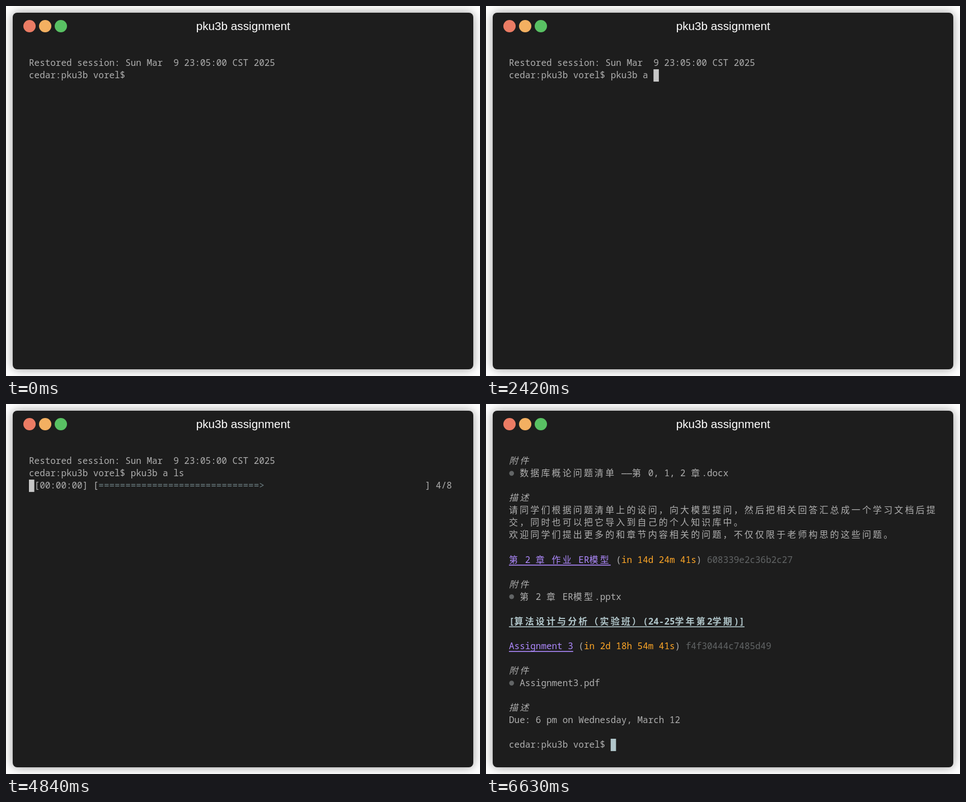
Recreate the animation shown at these times as an HTML page. Size 847 by 661 pixels, loop 8 s.

```html
<!DOCTYPE html>
<html lang="zh-CN">
<head>
<meta charset="utf-8">
<title>pku3b assignment</title>
<style>
  html, body { margin: 0; width: 100%; height: 100%; overflow: hidden; background: #fff; }
  #win {
    position: absolute; left: 12px; top: 12px; width: 823px; height: 637px;
    border-radius: 8px; background: #1d1d1d; box-shadow: 0 0 18px rgba(0, 0, 0, .4);
  }
  svg { position: absolute; left: 0; top: 0; display: block; }
  text { white-space: pre; fill: #afafaf; }
  #title { font: 20.7px "Liberation Sans", Arial, sans-serif; fill: #fff; text-anchor: middle; }
  #screen text { font: 15.945px "Noto Sans Mono", "DejaVu Sans Mono", monospace; }
  #screen .wide {
    font-family: "Noto Sans CJK SC", "Noto Sans CJK JP", "Noto Sans CJK", sans-serif;
    letter-spacing: 3.189px;
  }
  #screen .head { font-style: italic; }
  #screen .bar { fill: #708387; }
  #screen .link { fill: #ae89fe; }
  #screen .time { fill: #ffa727; }
  #screen .dim { fill: #626566; }
  #screen .course { fill: #b1c6ca; font-weight: bold; }
</style>
</head>
<body>
<div id="win"></div>
<svg width="847" height="661" viewBox="0 0 847 661">
  <circle cx="42" cy="36" r="11" fill="#eb7c64"/>
  <circle cx="70" cy="36" r="11" fill="#f3b061"/>
  <circle cx="98" cy="36" r="11" fill="#59c163"/>
  <text id="title" x="423.7" y="43">pku3b assignment</text>
  <g id="screen"></g>
</svg>
<script>
const LOOP = 8000, CELL = 9.567, ROW = 22.045, LEFT = 41, TOP = 91;
const PROMPT = 'cedar:pku3b vorel$ ', COMMAND = 'pku3b a ls';
const KEYS = [1360, 1420, 1680, 1830, 2060, 2230, 2320, 2420, 2730, 2850];
const ENTER = 3500, DONE = 6630;

// [start, message] before the bar, [start, position, total] after it
const STATUS = [
  [3600, 'reading config...'], [3850, 'logging in to blackboard...'], [4380, 'fetching courses...'],
  [4600, 1, 8], [4680, 2, 8], [4760, 3, 8], [4840, 4, 8], [5000, 5, 8], [5020, 6, 8],
  [5200, 6, 9], [5490, 6, 13], [5650, 7, 13], [5830, 8, 13], [5910, 9, 13], [6460, 10, 13]
];

const screenEl = document.getElementById('screen');
const WIDE = /[\u3000-\u9fff\uff00-\uffef]/;
const RUNS = /[\u3000-\u9fff\uff00-\uffef]+|[^\u3000-\u9fff\uff00-\uffef]+/g;
const px = col => LEFT + col * CELL;
const py = row => TOP + row * ROW;

function add(tag, attrs, text) {
  const el = document.createElementNS('http://www.w3.org/2000/svg', tag);
  for (const k in attrs) el.setAttribute(k, attrs[k]);
  if (text) el.textContent = text;
  screenEl.append(el);
}

// Writes text on the cell grid and returns the next free column
function put(row, col, text, cls = '') {
  for (const run of text.match(RUNS)) {
    const wide = WIDE.test(run);
    add('text', { x: px(col), y: py(row) + 16.2, class: cls + (wide ? ' wide' : '') }, run);
    col += run.length * (wide ? 2 : 1);
  }
  return col;
}

function underlined(row, text, cls, color) {
  const end = put(row, 0, text, cls);
  add('rect', { x: LEFT, y: py(row) + 19.6, width: end * CELL, height: 1.6, fill: color });
  return end;
}

function cursor(row, col, color = '#c7c7c7') {
  add('rect', { x: px(col), y: py(row), width: CELL, height: ROW, fill: color });
}

function bullet(row, text) {
  add('circle', { cx: px(0.5), cy: py(row) + 10.8, r: 4.3, fill: '#626566' });
  put(row, 2, text);
}

function task(row, name, left, hash) {
  let col = underlined(row, name, 'link', '#ae89fe');
  col = put(row, col + 1, '(');
  col = put(row, col, left, 'time');
  col = put(row, col, ')');
  put(row, col + 1, hash, 'dim');
}

function progress(start, pos, total) {
  const count = `] ${pos}/${total}`;
  const end = 79 - count.length;
  const secs = start < 5600 ? '00' : '01';
  const col = put(2, 1, `[00:00:${secs}] [`);
  put(2, col, '='.repeat(Math.floor((end - col) * pos / total)) + '>', 'bar');
  put(2, end, count);
}

function report() {
  for (const row of [0, 10, 17]) put(row, 0, '附件', 'head');
  for (const row of [3, 20]) put(row, 0, '描述', 'head');
  bullet(1, '数据库概论问题清单 ——第 0, 1, 2 章.docx');
  put(4, 0, '请同学们根据问题清单上的设问，向大模型提问，然后把相关回答汇总成一个学习文档后提');
  put(5, 0, '交，同时也可以把它导入到自己的个人知识库中。');
  put(6, 0, '欢迎同学们提出更多的和章节内容相关的问题，不仅仅限于老师构思的这些问题。');
  task(8, '第 2 章 作业 ER模型', 'in 14d 24m 41s', '608339e2c36b2c27');
  bullet(11, '第 2 章 ER模型.pptx');
  underlined(13, '[算法设计与分析（实验班）(24-25学年第2学期)]', 'course', '#b1c6ca');
  task(15, 'Assignment 3', 'in 2d 18h 54m 41s', 'f4f30444c7485d49');
  bullet(18, 'Assignment3.pdf');
  put(21, 0, 'Due: 6 pm on Wednesday, March 12');
  cursor(23, put(23, 0, PROMPT), '#b1c6ca');
}

function session(typed, entered, status) {
  put(0, 0, 'Restored session: Sun Mar  9 23:05:00 CST 2025');
  const col = put(1, 0, PROMPT + COMMAND.slice(0, typed));
  if (status) status.length > 2 ? progress(...status) : put(2, 2, status[1]);
  if (entered) cursor(2, 0);
  else if (typed) cursor(1, col);
}

let shown = '';
function draw(t) {
  const typed = KEYS.filter(k => k <= t).length;
  const step = STATUS.filter(s => s[0] <= t).length;
  const key = [typed, t >= ENTER, step, t >= DONE].join();
  if (key === shown) return;
  shown = key;
  screenEl.replaceChildren();
  if (t >= DONE) report();
  else session(typed, t >= ENTER, STATUS[step - 1]);
}

function tick() {
  draw(performance.now() % LOOP);
  requestAnimationFrame(tick);
}
tick();
</script>
</body>
</html>
```
